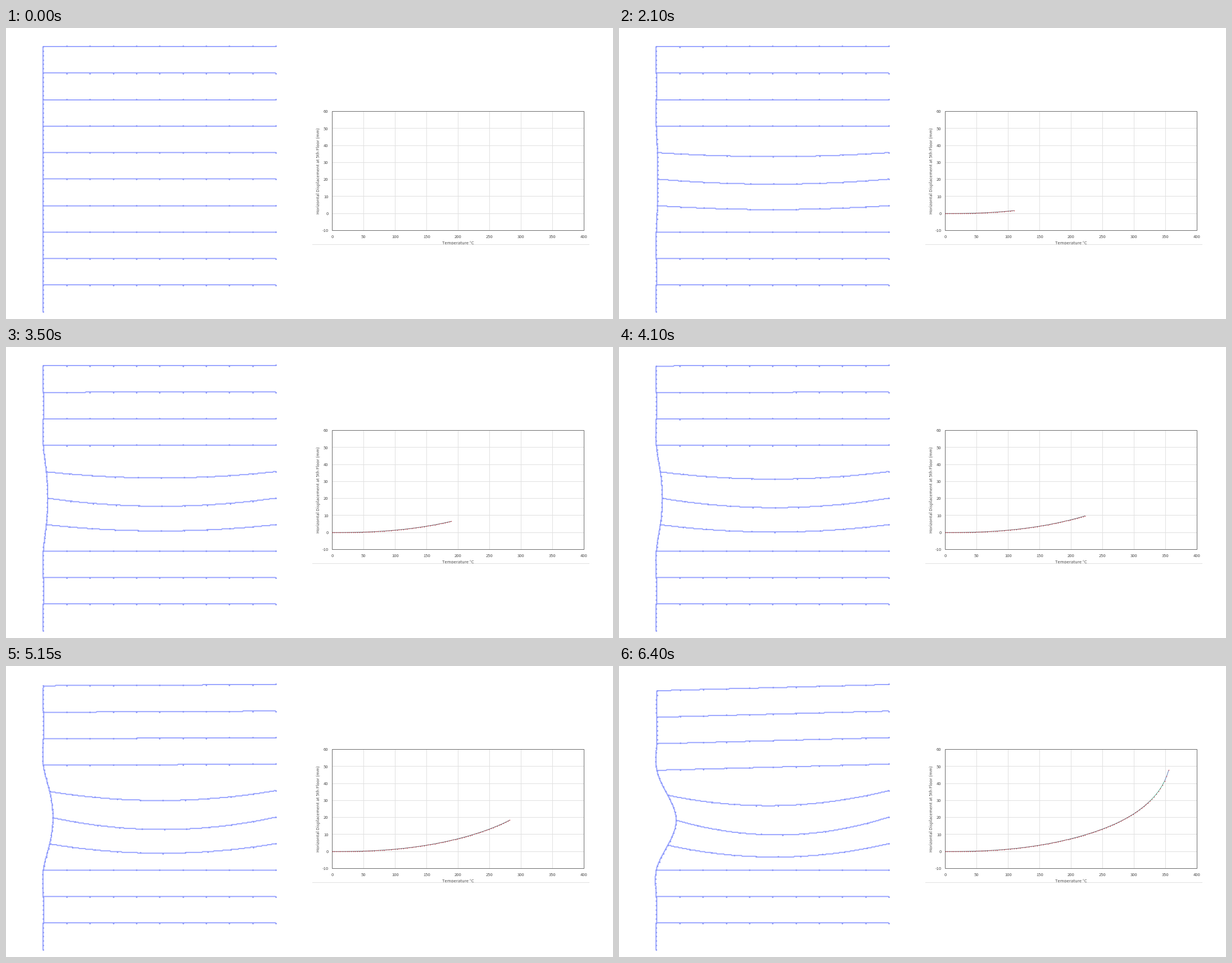
A matplotlib script for the animation above (6.5 s loop, 1080x518 px).

```python
import numpy as np
import matplotlib.pyplot as plt
from matplotlib.animation import FuncAnimation
from matplotlib.collections import LineCollection
from matplotlib.patches import Rectangle

W, H, DPI = 1080, 518, 100
PX = 72 / DPI                      # points per pixel
STEP_MS, LOOP_MS = 50, 6500
START_MS, END_MS = 100, 6400
FONT = "Noto Sans CJK JP"

fig = plt.figure(figsize=(W / DPI, H / DPI), dpi=DPI, facecolor="white")
ax = fig.add_axes([0, 0, 1, 1])
ax.set_xlim(0, W)
ax.set_ylim(H, 0)
ax.axis("off")

# ---------- chart ----------
LEFT, RIGHT, TOP, BOTTOM = 580, 1028, 148, 360
GRID, INK = "#e0e0e0", "#4c4c4c"


def temp_x(temp):
    return LEFT + (RIGHT - LEFT) * temp / 400


def disp_y(disp):
    return BOTTOM - (BOTTOM - TOP) * (disp + 10) / 70


def label(x, y, text, va="center_baseline", **kw):
    ax.text(x, y, text, family=FONT, fontsize=7.6 * PX, color=INK, va=va, **kw)


for temp in range(0, 401, 50):
    ax.plot([temp_x(temp)] * 2, [TOP, BOTTOM], color=GRID, lw=PX, zorder=1)
    label(temp_x(temp) + .5, 371, str(temp), ha="center")
for disp in range(-10, 61, 10):
    ax.plot([LEFT, RIGHT], [disp_y(disp)] * 2, color=GRID, lw=PX, zorder=1)
    label(573.5, disp_y(disp) + .3, str(disp), ha="right")
ax.add_patch(Rectangle((LEFT, TOP), RIGHT - LEFT, BOTTOM - TOP, fill=False,
                       ec="#6c6c6c", lw=PX, zorder=2))
label(556.5, 254.5, "Horizontal Displacement at 5th Floor (mm)",
      va="center", rotation=90, ha="center")
label(804.5, 382, "Temperature °C", ha="center")
# the chart frame cuts off the descenders of the axis title
ax.add_patch(Rectangle((545, 385), 492, 8, color="white", lw=0, zorder=4))
ax.plot([545, 1037], [385] * 2, color=GRID, lw=PX, zorder=5)

POINTS, MAX_TEMP = 108, 355
heat = np.linspace(0, 1, POINTS)
# slow power-law growth, then a runaway close to the end
disps = 30.6 * heat ** 2.45 + 13 * heat ** 11 + 4.2 * heat ** 50
curve = np.column_stack([temp_x(MAX_TEMP * heat), disp_y(disps)]) + .5
pieces = np.stack([curve[:-1], curve[1:]], axis=1)
piece_colors = np.select([heat > .975, heat > .91], ["#5577b0", "#45a086"], "#55555f")

trace = LineCollection([], lw=.9 * PX, zorder=6, snap=False)
ax.add_collection(trace)
trace_dots, = ax.plot([], [], "o", ms=1.5 * PX, mew=0, color="#cc3540",
                      snap=False, zorder=7)

# ---------- structure ----------
CELL = 1.377                       # coarse pixel of the structural view
GRID_X, GRID_Y = 65.8, 33
COL_X, END_X = GRID_X + .4999 * CELL, 480
FLOORS = np.arange(11)
LEVELS = GRID_Y + 47.2 * FLOORS
HOT = 5                            # middle of the three heated floors

frame_lines, = ax.plot([], [], color="#9ca7ff", lw=2 * PX, zorder=3, snap=False,
                       solid_capstyle="butt", solid_joinstyle="miter")
frame_dots, = ax.plot([], [], "o", ms=2.8 * PX, mew=0, color="#8b97f8",
                      snap=False, zorder=3.5)

# slopes of a C2 cubic spline through the floors
SPLINE = 4 * np.eye(11) + np.eye(11, k=1) + np.eye(11, k=-1)
SPLINE[0, 0] = SPLINE[-1, -1] = 2


def snap_line(value, origin):
    return origin + CELL * np.round((value - origin) / CELL)


def snap_dot(value, origin):
    """Node marks sit between two cells."""
    return origin + CELL * (np.floor((value - origin) / CELL - .02) + .5)


def bend(offsets, s):
    """Cubic spline through the floor offsets, at fractional floor s."""
    pad = np.pad(offsets, 1, mode="edge")
    slope = np.linalg.solve(SPLINE, 3 * (pad[2:] - pad[:-2]))
    i = np.minimum(s.astype(int), 9)
    u = s - i
    return ((1 + 2 * u) * (1 - u) ** 2 * offsets[i] + u * (1 - u) ** 2 * slope[i]
            + u * u * (3 - 2 * u) * offsets[i + 1] + u * u * (u - 1) * slope[i + 1])


def structure(p, drive):
    """Pose at heating progress p and relative displacement drive, both 0..1."""
    middle = 35.3 * drive ** .77
    push = np.where(FLOORS < 4, .8 * drive ** 4, 0)
    push[HOT] = middle
    push[[HOT - 1, HOT + 1]] = middle * (.72 - .145 * drive)
    drop = 11 * drive ** 1.7 * np.clip((7 - FLOORS) / 4, 0, 1)
    sag = np.zeros(11)
    sag[HOT] = 34 * p - 24 * p ** 2 + 18.8 * p ** 3
    sag[[HOT - 1, HOT + 1]] = .78 * sag[HOT]

    def column(s):
        return COL_X + bend(push, s), np.interp(s, FLOORS, LEVELS + drop)

    def beam(n, u):
        x = COL_X + push[n] + (END_X - COL_X - push[n]) * u
        return x, LEVELS[n] + drop[n] * (1 - u) + 4 * sag[n] * u * (1 - u)

    x, y = column(np.linspace(0, 10, 351))
    lines = [(snap_line(x, GRID_X), y)]
    x, y = column(np.arange(61) / 6)
    dots = [(snap_dot(x, GRID_X), y)]
    for n in range(10):
        x, y = beam(n, np.linspace(0, 1, 301))
        lines += [([np.nan], [np.nan]), (x, snap_line(y, GRID_Y))]
        x, y = beam(n, np.arange(1, 11) / 10)
        dots.append((x, snap_dot(y, GRID_Y)))
    frame_lines.set_data(np.hstack(lines))
    frame_dots.set_data(np.hstack(dots))


def update(i):
    t = i * STEP_MS
    p = np.clip((t - START_MS) / (END_MS - START_MS), 0, 1)
    last = int(p * (POINTS - 1))
    structure(p, disps[last] / disps[-1])
    trace.set_segments(pieces[:last])
    trace.set_color(list(piece_colors[:last]) or "none")
    shown = curve[:last + 1 if t >= START_MS else 0]
    trace_dots.set_data(shown[:, 0], shown[:, 1])
    return frame_lines, frame_dots, trace, trace_dots


anim = FuncAnimation(fig, update, frames=LOOP_MS // STEP_MS, interval=STEP_MS,
                     repeat=True, repeat_delay=0, blit=False)
plt.show()
```
